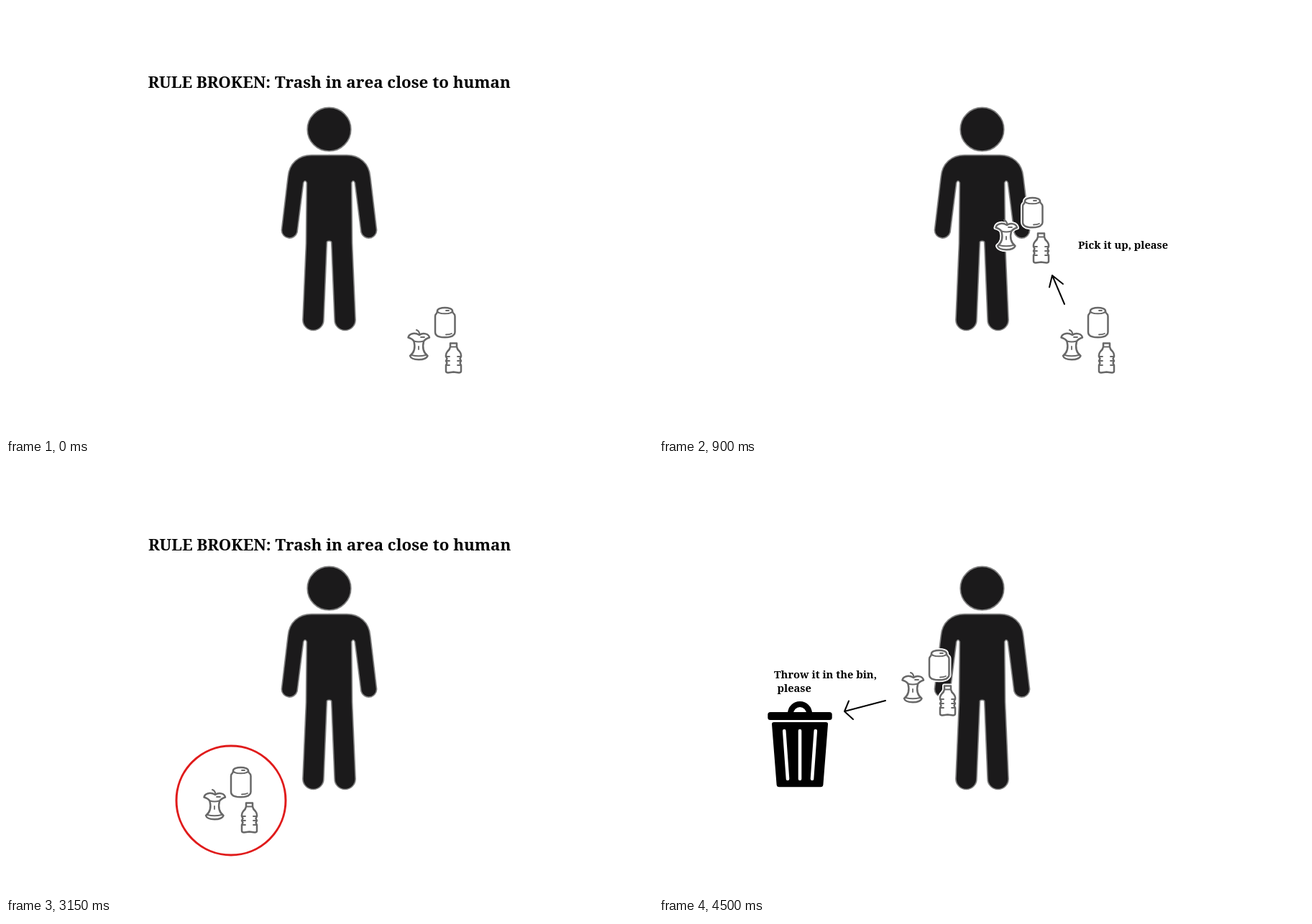
Recreate the animation shown at these times as an HTML page. Size 900 px wide and 600 px high, loop 5.4 s.

```html
<!DOCTYPE html>
<html lang="en">
<head>
<meta charset="utf-8">
<title>Trash rule</title>
<style>
  html, body { margin: 0; width: 100%; height: 100%; overflow: hidden; background: #fff; }
  svg { display: block; width: 900px; height: 600px; }
  text { font: bold 14.7px "Noto Serif", serif; white-space: pre; }
  .title { font-size: 22.35px; }
  .arrow { fill: none; stroke: #000; stroke-width: 2; stroke-linecap: round; stroke-linejoin: round; }
  .ring { fill: none; stroke: #e01b1b; stroke-width: 3; }

  /* Each scene owns one slot of the loop; --at is its start. */
  .scene {
    visibility: hidden;
    animation: long 5400ms step-end calc(var(--at) * 1ms - 5400ms) infinite;
  }
  .scene.short { animation-name: short; }
  @keyframes long  { 0% { visibility: visible; } 16.66667%, 100% { visibility: hidden; } }
  @keyframes short { 0% { visibility: visible; } 8.33333%, 100% { visibility: hidden; } }
</style>
</head>
<body>
<svg viewBox="0 0 900 600">
  <defs>
    <path id="half" d="M450 207.7H425C407 207.7 394 219 392.2 238L383.4 312A11 11 0 0 0 405 315L413.7 246Q416 241 418.3 246L417.5 330L412.9 437A14.5 14.5 0 0 0 441.9 437L446.3 329Q446.6 327 450 327"/>

    <g id="outlines">
      <path d="M600 424.5C600 418.6 621 418.6 621 424.5Q621 427 623 428.5Q624.5 429.5 624.5 432V454Q624.5 456.5 622.5 458Q620 461.3 610.5 461.3T598.5 458Q597 456.5 597 454V432Q597 429.5 598.5 428.5Q600 427 600 424.5Z"/>
      <path d="M575 458C568 454 560.5 456 559.5 461.5Q566 463.5 567.5 467C569 473 570 481 562 487C564 494 584 494 586.5 487C578.5 481 579.5 473 581 467Q583 463.5 589 461.5C588 456 580 454.5 575 458Z"/>
      <path d="M618 469.5H627V474.5Q627.5 478 631 481Q633.5 484 633 488L631.5 491L633 494L631.5 497L633 500V508Q633 510.5 630 510.5L622.5 509.5L615 510.5Q612 510.5 612 508V500L613.5 497L612 494L613.5 491L612 488Q611.5 484 614 481Q617.5 478 618 474.5Z"/>
    </g>

    <g id="trash" stroke-linecap="round" stroke-linejoin="round">
      <use href="#outlines" fill="#fff" stroke="#fff" stroke-width="6"/>
      <g stroke="#686868" stroke-width="2.5" fill="none">
        <use href="#outlines" fill="#fff"/>
        <path d="M600 424.5C600 429.6 621 429.6 621 424.5" stroke-width="2"/>
        <path d="M612 424H616M612 457.5Q617 457.5 620 456" stroke-width="1.8"/>
        <path d="M571 451Q575 452.5 575.5 457.5M567.5 466.5Q574 468.5 581 466.5M564 486Q574 488.5 584 486" stroke-width="2.1"/>
        <path d="M574 474V478M577 461H582" stroke-width="1.8"/>
        <path d="M618 474.5H627M613 488H617M613 494H617M613 500H617M628 488H632M628 494H632M628 500H632" stroke-width="1.8"/>
      </g>
    </g>

    <g id="bin">
      <path d="M682 349A13 13 0 0 1 708 349" fill="none" stroke="#000" stroke-width="8"/>
      <rect x="650.3" y="347" width="89.4" height="11" rx="3.5"/>
      <path d="M659 361H731Q734.3 361 734 364L727.4 448Q727 451.3 724 451.3H666Q663 451.3 662.6 448L656 364Q655.7 361 659 361Z"/>
      <path d="M673.2 373L678 440M695 373V440M716.8 373L712 440" stroke="#fff" stroke-width="4.6" stroke-linecap="round"/>
    </g>
  </defs>

  <rect width="900" height="600" fill="#fff"/>
  <g fill="#1b1a1b" stroke="#808080" stroke-width="1.7">
    <circle cx="449.5" cy="171.7" r="30.3"/>
    <use href="#half"/>
    <use href="#half" transform="matrix(-1 0 0 1 899 0)"/>
  </g>

  <g class="scene short" style="--at:0">
    <text class="title" x="197.5" y="114">RULE BROKEN: Trash in area close to human</text>
    <use href="#trash"/>
  </g>

  <g class="scene short" style="--at:450">
    <text class="title" x="193" y="119">RULE BROKEN: Trash in area close to human</text>
    <use href="#trash"/>
    <circle class="ring" cx="597" cy="466" r="76"/>
  </g>

  <g class="scene" style="--at:900">
    <use href="#trash"/>
    <use href="#trash" x="-91" y="-153"/>
    <path class="arrow" d="M564 415L547 375M543 391.5L547 375L562 387"/>
    <text x="583" y="338">Pick it up, please</text>
  </g>

  <g class="scene" style="--at:1800">
    <use href="#trash" x="-100" y="-170"/>
    <use href="#bin"/>
    <path class="arrow" d="M561 309L629 339M624 325.5L629 339L616 342"/>
    <text x="581" y="292">Throw it in the bin,</text>
    <text x="585.5" y="311">please</text>
  </g>

  <g class="scene short" style="--at:2700">
    <text class="title" x="191.5" y="119">RULE BROKEN: Trash in area close to human</text>
    <use href="#trash" x="-284" y="1"/>
  </g>

  <g class="scene short" style="--at:3150">
    <text class="title" x="198" y="119">RULE BROKEN: Trash in area close to human</text>
    <use href="#trash" x="-284" y="1"/>
    <circle class="ring" cx="313" cy="467" r="76"/>
  </g>

  <g class="scene" style="--at:3600">
    <use href="#trash" x="-284" y="1"/>
    <use href="#trash" x="-221" y="-162"/>
    <path class="arrow" d="M330 406L361 350M347 352L361 350L367 360"/>
    <text x="259" y="371">Pick it up,</text>
    <text x="259" y="390">please</text>
  </g>

  <g class="scene" style="--at:4500">
    <use href="#trash" x="-221" y="-162"/>
    <use href="#bin" x="-499" y="-3"/>
    <path class="arrow" d="M315 328L258 343M264 328.5L258 343L270 354"/>
    <text x="160" y="297">Throw it in the bin,</text>
    <text x="164.5" y="316">please</text>
  </g>
</svg>
</body>
</html>
```
